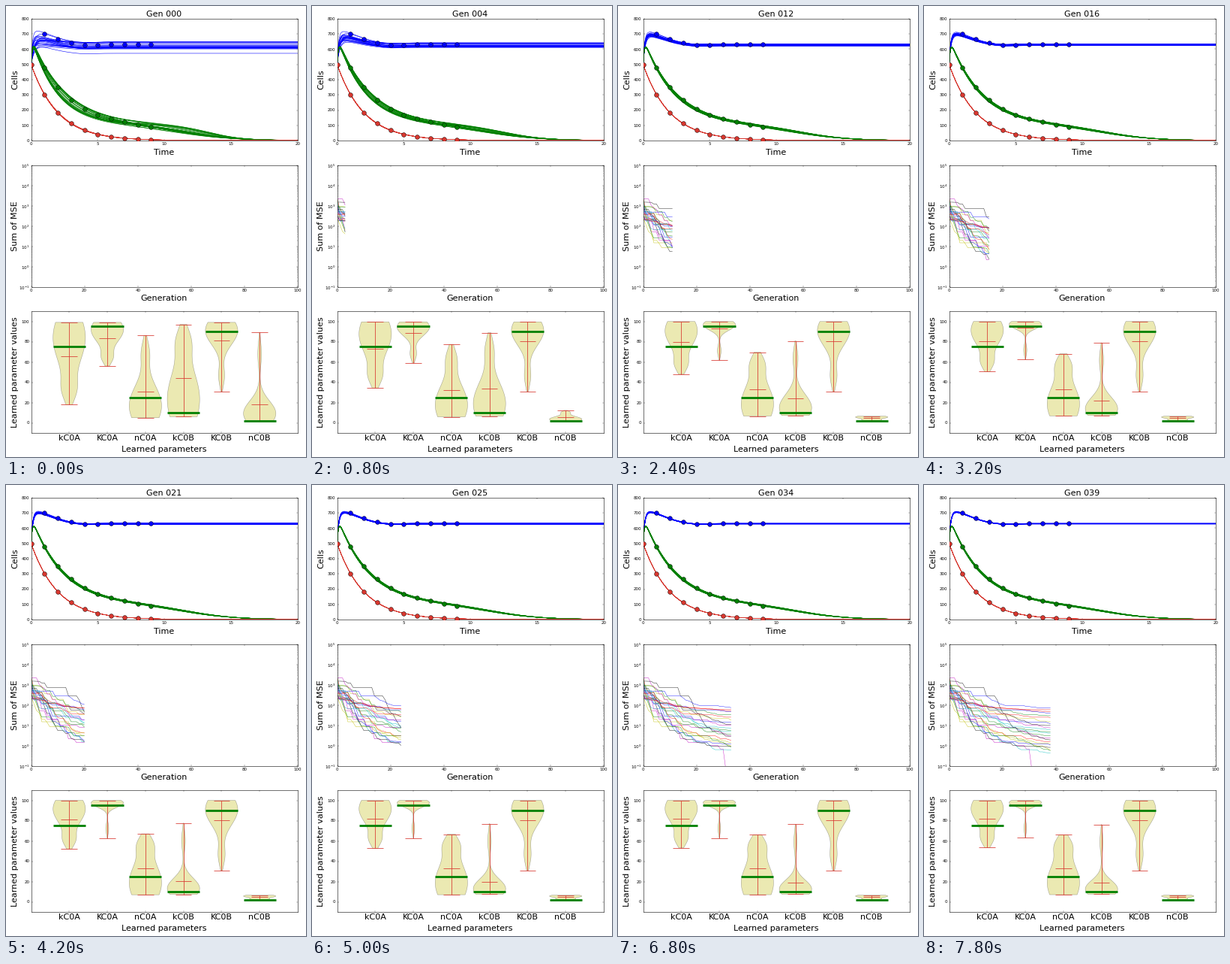
A matplotlib script that plays this animation: 400 px wide and 600 px high, repeating every 8000 ms.

```python
import numpy as np
import matplotlib.pyplot as plt
from matplotlib.animation import FuncAnimation

W, H, DPI = 400, 600, 40
GENS, STEP_MS = 40, 200
POP, RUNS = 25, 24
RED = "#d8372f"
RNG = np.random.default_rng(12)

plt.rcParams.update({
    "font.family": "DejaVu Sans", "font.size": 10,
    "axes.linewidth": 1.0, "lines.linewidth": 1.0,
    "lines.solid_capstyle": "butt",
})
for side in ("xtick", "ytick"):
    plt.rcParams.update({
        f"{side}.direction": "in", f"{side}.major.pad": 4,
        f"{side}.major.size": 4, f"{side}.minor.size": 2,
        f"{side}.major.width": 0.5, f"{side}.minor.width": 0.5,
    })
plt.rcParams.update({"xtick.top": True, "ytick.right": True})

fig = plt.figure(figsize=(W / DPI, H / DPI), dpi=DPI, facecolor="white")


def panel(top, xlim, ylim, yscale="linear"):
    ax = fig.add_axes([33.5 / W, 1 - (top + 162) / H, 355.5 / W, 162 / H])
    ax.set_yscale(yscale)
    ax.set_xlim(*xlim)
    ax.set_ylim(*ylim)
    return ax


def label(x, y, text, angle=0):
    return fig.text(x / W, 1 - y / H, text, size=20, rotation=angle,
                    ha="center", va="baseline", rotation_mode="anchor")


def ease(start, end, gen, tau):
    """Exponential approach from start to end over the generations."""
    return end + (start - end) * np.exp(-gen / tau)


# ---- population dynamics -------------------------------------------------

def blue_curve(t, off=0.0, dip=0.0, slow=0.0):
    amp = 88 * (1 - dip)
    rise = np.exp(-t / (0.12 * (1 + slow)))
    hump = amp * np.exp(-t ** 2 / 4.33) - 4 * np.exp(-(t - 4) ** 2)
    return 630 + off + hump - (130 + off + amp) * rise


def green_curve(t, rate=0.0, late=0.0):
    fast = 579 * np.exp(-t / (2.4 * (1 + rate)))
    mid, width = 11.4 + 2 * late, 2.0 * (1 - 0.35 * late)
    tail = 100 * (1 + 0.06 * late) / (1 + np.exp((t - mid) / width))
    return fast + tail - 179 * np.exp(-t / 0.09)


def red_curve(t, rate=0.0):
    return 500 * np.exp(-0.5 * t * (1 + rate))


cells = panel(17, (0, 20), (0, 800))
cells.set_xticks(range(0, 21, 5))
cells.set_yticks(range(0, 801, 100))

t = 20 * np.linspace(0, 1, 220) ** 2
off = RNG.uniform(-28, 20, POP)
outlier = 55 * (RNG.random(POP) < 0.1)
dip = RNG.uniform(0, 0.85, POP)
slow = RNG.uniform(-0.3, 1.2, POP)
rate = RNG.uniform(-0.22, 0.12, POP)
late = RNG.uniform(-0.2, 1.0, POP)
wobble = RNG.uniform(-0.02, 0.02, POP)


def bundle(color, width):
    return [cells.plot([], [], color=color, lw=width)[0] for _ in range(POP)]


blues, greens, reds = bundle("b", 1), bundle("g", 1.2), bundle(RED, 0.7)

days = np.arange(10.0)
for curve, color, first in ((blue_curve, "b", 1), (green_curve, "g", 1),
                            (red_curve, RED, 0)):
    cells.plot(days[first:], curve(days[first:]), "o", color=color,
               ms=10.5, mec="black", mew=0.8, zorder=4)


def draw_cells(gen):
    s = ease(1, 0.07, gen, 9)
    loose = ease(1, 0.22, gen, 6)
    for i in range(POP):
        shift = off[i] * s - outlier[i] * np.exp(-gen)
        blues[i].set_data(t, blue_curve(t, shift, dip[i] * s, slow[i] * s))
        greens[i].set_data(t, green_curve(t, rate[i] * loose, late[i] * loose))
        reds[i].set_data(t, red_curve(t, wobble[i] * s))


# ---- error history -------------------------------------------------------

errors = panel(212, (0, 100), (0.1, 1e5), "log")
errors.set_xticks(range(0, 101, 20))
errors.set_yticks([10.0 ** k for k in range(-1, 6)])
steps = np.arange(GENS)


def staircase(start, end):
    """Random downward steps that get smaller with time."""
    drops = RNG.random(GENS - 1) * (RNG.random(GENS - 1) < 0.5)
    drops *= np.exp(-steps[:-1] / 14)
    fall = np.append(0, np.cumsum(drops)) / drops.sum()
    return start + (end - start) * fall


starts = RNG.uniform(2.3, 3.4, RUNS)
ends = RNG.permutation(np.linspace(1.88, -0.4, RUNS))
history = [staircase(a, b) for a, b in zip(starts, ends)]
best = 4
history[best] = staircase(3.1, -0.35) - np.maximum(0, steps - 30)

runs = [errors.plot([], [], color="bgrcmyk"[i % 7], lw=0.9, alpha=0.8)[0]
        for i in range(RUNS)]


def draw_errors(gen):
    for line, logs in zip(runs, history):
        line.set_data(steps[:gen], 10.0 ** logs[:gen])


# ---- learned parameters --------------------------------------------------

params = panel(406, (0, 7), (-10, 110))
params.set_yticks(range(0, 101, 20))
HALF = 0.425


def density(y, low, mean, high):
    """Peak by the extreme nearest the mean, shoulder towards the other one."""
    near, far = sorted((low, high), key=lambda v: abs(v - mean))
    reach = abs(mean - near)
    skew = reach / abs(far - mean)
    peak = near + 0.45 * (mean - near)
    shoulder = mean + 0.7 * (far - mean)
    w = np.exp(-((y - peak) / (0.78 * reach)) ** 2 / 2)
    w += 0.5 * skew * np.exp(-((y - shoulder) * 7 / (high - low)) ** 2 / 2)
    return w / w.max()


class Violin:
    def __init__(self, x, truth, start, end, tau):
        self.x, self.tau = x, tau
        self.start, self.end = np.array(start), np.array(end)
        self.body, = params.fill([x, x, x], [0, 0, 0], lw=1,
                                 fc=(0.75, 0.72, 0, 0.3), ec=(0, 0, 0, 0.32))
        self.bars = [params.plot([], [], color=RED, lw=1.4)[0] for _ in range(4)]
        params.plot([x - HALF, x + HALF], [truth] * 2, color="g", lw=5, zorder=5)

    def draw(self, gen):
        levels = ease(self.start, self.end, gen, self.tau)
        low, _, high = levels
        y = np.linspace(low, high, 80)
        w = HALF * density(y, *levels)
        self.body.set_xy(np.column_stack([np.append(self.x - w, (self.x + w)[::-1]),
                                          np.append(y, y[::-1])]))
        for bar, v in zip(self.bars, levels):
            bar.set_data([self.x - HALF / 2, self.x + HALF / 2], [v, v])
        self.bars[3].set_data([self.x] * 2, [low, high])


# Name, true value, (low, mean, high) at the start and once settled, pace.
SPECS = [
    ("kC0A", 75, (18, 65.5, 99), (53.5, 82, 100), 6.5),
    ("KC0A", 95, (56, 83, 99), (63, 95, 100), 7),
    ("nC0A", 25, (5, 31, 86), (7, 33, 66), 7),
    ("kC0B", 10, (6, 44, 97), (7.5, 18.5, 76), 8),
    ("KC0B", 90, (31, 81, 99), (31, 80, 100), 7),
    ("nC0B", 2, (2, 18, 89), (2, 4.5, 6.5), 1.5),
]
violins = [Violin(x, *spec[1:]) for x, spec in enumerate(SPECS, 1)]
params.set_xticks(range(1, 7), [spec[0] for spec in SPECS], size=20)

# ---- labels and animation ------------------------------------------------

title = label(211, 14.3, "")
label(211, 198.5, "Time")
label(211, 392.5, "Generation")
label(211, 592.8, "Learned parameters")
label(15.5, 97.5, "Cells", 90)
label(14.8, 293, "Sum of MSE", 90)
label(15.5, 487, "Learned parameter values", 90)


def draw(gen):
    title.set_text(f"Gen {gen:03d}")
    draw_cells(gen)
    draw_errors(gen)
    for violin in violins:
        violin.draw(gen)
    return []


anim = FuncAnimation(fig, draw, frames=GENS, interval=STEP_MS,
                     init_func=lambda: draw(0), repeat=True, repeat_delay=0, blit=False)
plt.show()
```
